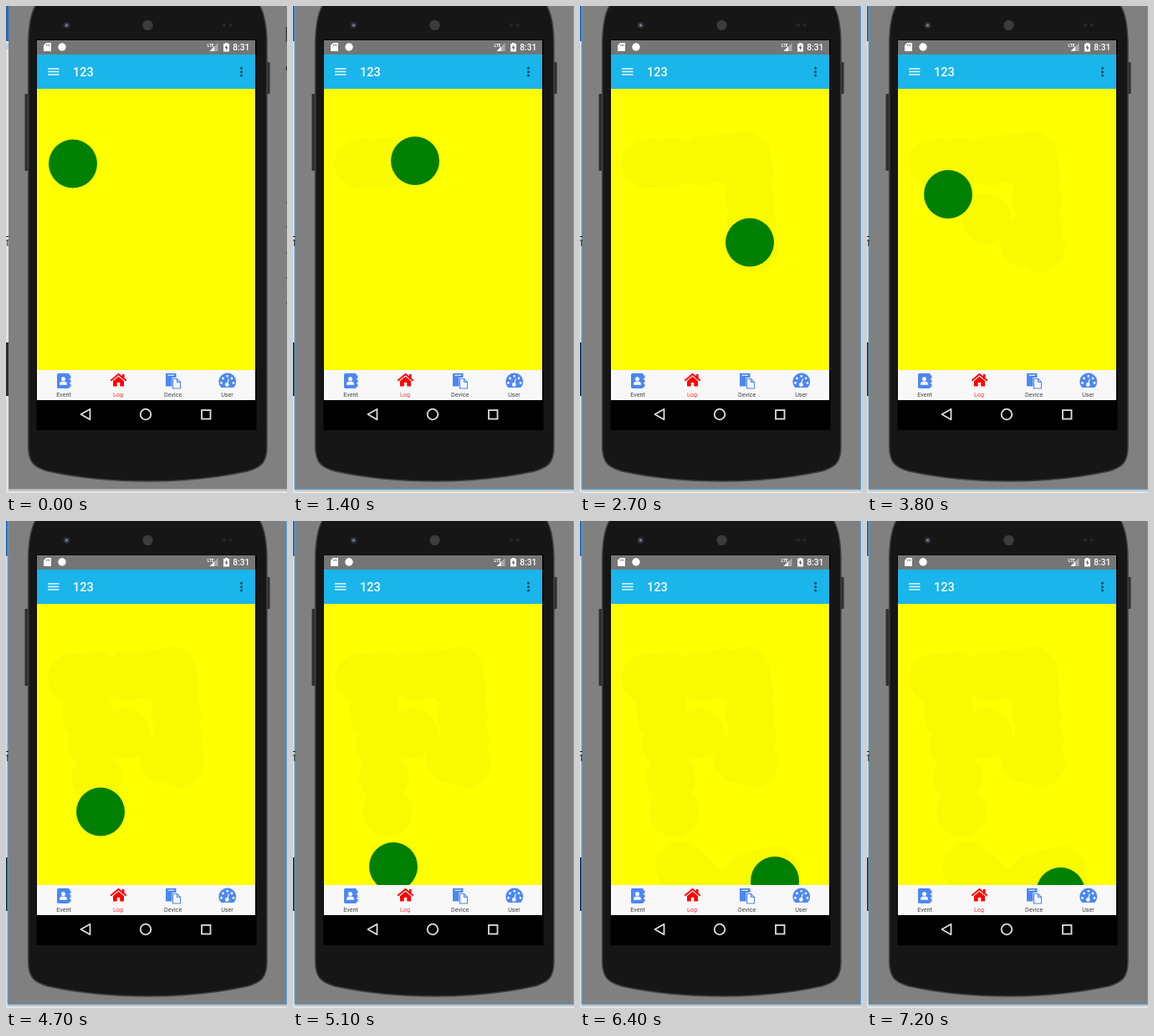
Write an HTML page that moves like this. It is 336 px wide and 582 px high and loops after 8000 ms.

```html
<!DOCTYPE html>
<html lang="en">
<head>
<meta charset="utf-8">
<title>Draggable disc</title>
<style>
  html, body { margin: 0; width: 100%; height: 100%; overflow: hidden; background: #808080; }
  svg { display: block; width: 100vw; height: 100vh; }
  text { font-family: Roboto, sans-serif; }
  .tab { font-size: 7.2px; text-anchor: middle; fill: #444; }
  .line { fill: none; }
</style>
</head>
<body>
<svg viewBox="0 0 336 582" xmlns="http://www.w3.org/2000/svg">
  <defs>
    <clipPath id="page"><rect x="37" y="99" width="261" height="336.5"/></clipPath>
    <linearGradient id="shade" x1="0" y1="0" x2="0" y2="1">
      <stop offset="0" stop-color="#a8a8a8"/><stop offset="1" stop-color="#f2f2f2"/>
    </linearGradient>
    <pattern id="mesh" width="2" height="2" patternUnits="userSpaceOnUse">
      <circle cx="1" cy="1" r=".6" fill="#777"/>
    </pattern>
  </defs>

  <rect width="336" height="582" fill="#808080"/>
  <rect y="577" width="336" height="5" fill="url(#shade)"/>

  <!-- window edges, before and after focus -->
  <g id="idleEdge">
    <path d="M0 0H3V582H0Z" fill="#dfe2e5"/>
    <path d="M0 0H3V42H0Z" fill="#2167bd"/>
    <path d="M0 44H3V52H0Z" fill="#b9cfe8"/>
    <path d="M0 402H3V466H0Z" fill="#2b2b2b"/>
    <path d="M335.5 25V43M335.5 72V77M335 235H336M335 264H336M335 295H336M335 325H336M335 355H336" stroke="#333" stroke-width="1.5"/>
  </g>
  <g id="activeEdge">
    <path d="M0 0H2V582H0Z" fill="#dae5ee"/>
    <path d="M0 0H2V42H0Z" fill="#0f60b5"/>
    <path d="M0 402H2V466H0Z" fill="#0d2a42"/>
    <path class="line" d="M2 0V577.5H335.5V0" stroke="#55a5dc"/>
  </g>
  <path class="line" d="M0 275.5H3M0 280H3M1.8 280V287" stroke="#222"/>

  <!-- phone body -->
  <rect x="22.5" y="105" width="4.5" height="92" rx="1" fill="#303030"/>
  <rect x="311" y="67" width="4.5" height="38" rx="1" fill="#303030"/>
  <path d="M36 -2C31 6 27 18 26.7 45V526C26.7 545 33 551 50 556Q105 568 169.300 568Q234 568 289 556C306 551 312 545 312 526V45C311.700 18 307.500 6 302.500 -2Z" fill="#161616" stroke="#414141" stroke-width="1.500"/>
  <circle cx="72.5" cy="23" r="3.8" fill="#30343a"/>
  <circle cx="72.5" cy="23" r="1.6" fill="#7886a0"/>
  <circle cx="169.5" cy="23" r="6.3" fill="#2a2a2a"/>
  <circle cx="169.5" cy="23" r="6" fill="url(#mesh)"/>
  <circle cx="261" cy="23" r="2" fill="#272727"/>
  <circle cx="268.5" cy="23" r="2" fill="#272727"/>
  <rect x="36.5" y="40.5" width="263" height="466.5" fill="#000"/>

  <!-- status bar -->
  <rect x="37" y="41" width="261" height="17" fill="#757575"/>
  <path d="M48 44H54V54H45V47Z" fill="#fff"/>
  <path d="M48.5 45.5V48M50.3 45.5V48M52.1 45.5V48" stroke="#757575" stroke-width=".8"/>
  <circle cx="67" cy="49" r="4.7" fill="#fff"/>
  <path d="M253.5 44V54H243.5Z" fill="#a9a9a9"/>
  <path d="M249 48.5V54H243.5Z" fill="#fff"/>
  <text x="240.5" y="49" font-size="5" font-weight="700" fill="#fff">LTE</text>
  <path d="M260 45H262V44H265V45H267V54.5H260Z" fill="#fff"/>
  <path d="M264 46.5L261.5 50.3H263.2V53L265.6 49.3H264Z" fill="#666"/>
  <text x="271.3" y="53" font-size="10.2" font-weight="500" fill="#fff">8:31</text>

  <!-- app bar -->
  <rect x="37" y="58" width="261" height="41" fill="#1ab5ea"/>
  <path d="M50 75H63.500M50 78.500H63.500M50 82H63.500" stroke="#e8f7fd" stroke-width="1.400"/>
  <text x="80" y="84" font-size="14.5" font-weight="500" fill="#fff">123</text>
  <path d="M281.500 74.300v0M281.500 78.700v0M281.500 83.100v0" stroke="#0e4a61" stroke-width="3" stroke-linecap="round"/>

  <!-- drag area -->
  <g clip-path="url(#page)">
    <rect x="37" y="99" width="261" height="337" fill="#ff0"/>
    <g id="trail" fill="#f9fa00"></g>
    <circle id="disc" r="29" fill="#008000"/>
  </g>

  <!-- tab bar -->
  <rect x="37" y="435" width="261" height="36" fill="#f8f8f8"/>
  <g fill="#4c87f2">
    <rect x="61" y="439" width="15" height="18" rx="1.8"/>
    <path d="M75.5 441.5H77.5V445H75.5ZM75.5 446.5H77.5V450H75.5ZM75.5 451.5H77.5V455H75.5Z"/>
    <g fill="#fff"><circle cx="68.5" cy="445.7" r="2.5"/><path d="M64 452.8Q64 448.8 67 448.8H70Q73 448.8 73 452.8Z"/></g>
    <path d="M191 439H203.5V444H198.5V454.5H191Z"/>
    <path d="M193.5 441.3H201" stroke="#fff" stroke-width="1"/>
    <path d="M199.5 445.5H204.5L208.5 449.5V457H199.5ZM204.5 445.5V449.5H208.5" fill="#f8f8f8" stroke="#4c87f2" stroke-width="1.1"/>
    <path d="M257.2 456A10.4 10.4 0 1 1 272.3 456Z"/>
    <path d="M257.5 450.5v0M259.5 445v0M264.7 442.300v0M270 445v0M272 450.500v0" stroke="#f8f8f8" stroke-width="2.800" stroke-linecap="round"/>
    <circle cx="264.3" cy="452.5" r="2.4" fill="#f8f8f8"/>
    <path d="M264.5 452L266.3 445.5" stroke="#f8f8f8" stroke-width="1.2"/>
  </g>
  <g fill="#f00">
    <path class="line" d="M125.3 447.8L134.5 440L143.7 447.8" stroke="#f00" stroke-width="2"/>
    <path d="M139 440H141.5V446H139Z"/>
    <path d="M128 448.3L134.5 442.8L141 448.3V454.5H136.3V450H132.7V454.5H128Z"/>
  </g>
  <text class="tab" x="69" y="467">Event</text>
  <text class="tab" x="134" y="467" style="fill:#ff3434">Log</text>
  <text class="tab" x="199.7" y="467">Device</text>
  <text class="tab" x="264.5" y="467">User</text>

  <!-- system keys -->
  <g class="line" stroke="#dedede" stroke-width="1.8">
    <path d="M100.5 481.8V494.2L89.5 488Z" stroke-linejoin="round"/>
    <circle cx="167" cy="488" r="6.3"/>
    <rect x="234" y="483" width="10.5" height="10.5"/>
  </g>
</svg>
<script>
const LOOP = 8000, FOCUS = 900, STEP = 100;

// Drag strokes: when each begins, when it ends and where it leads.
const home = { end: 0, x: 80, y: 188.5 };
const strokes = [
  [1100, 1400, 146, 185],
  [1400, 1600, 198, 180],
  [1600, 2000, 201, 203],
  [2000, 2300, 207, 288.5],
  [2600, 2700, 203, 282.5],
  [3300, 3400, 189, 283],
  [3400, 3600, 97, 225],
  [4300, 4500, 104, 266],
  [4500, 4700, 113, 347.5],
  [4700, 4800, 120, 413],
  [5600, 5900, 155, 442],
  [5900, 6000, 199, 428],
  [6000, 6200, 232, 418],
  [6200, 6400, 233, 430],
  [6700, 6900, 227, 430],
  [7000, 7200, 231.5, 443]
].map(([start, end, x, y]) => ({ start, end, x, y }));

const mix = (a, b, u) => a + (b - a) * u;

// A stroke that begins from rest speeds up; one that carries on is even.
function discAt(t) {
  let from = home;
  for (const to of strokes) {
    if (t <= to.start) break;
    const u = Math.min(1, (t - to.start) / (to.end - to.start));
    const k = to.start > from.end ? u * u : u;
    if (u < 1) return { x: mix(from.x, to.x, k), y: mix(from.y, to.y, k) };
    from = to;
  }
  return from;
}

const el = id => document.getElementById(id);
const show = (node, on) => node.setAttribute("visibility", on ? "visible" : "hidden");
const place = (node, p) => {
  node.setAttribute("cx", p.x);
  node.setAttribute("cy", p.y);
};

// The disc leaves a faint mark at every place it has left.
const disc = el("disc"), marks = [];
for (let t = STEP; t < LOOP; t += STEP) {
  const p = discAt(t - STEP), next = discAt(t);
  if (p.x === next.x && p.y === next.y) continue;
  const node = document.createElementNS("http://www.w3.org/2000/svg", "circle");
  node.setAttribute("r", 30);
  place(node, p);
  marks.push({ node: el("trail").appendChild(node), t });
}

function draw(time) {
  const t = time % LOOP;
  place(disc, discAt(Math.floor(t / STEP) * STEP));
  marks.forEach(m => show(m.node, t >= m.t));
  show(el("idleEdge"), t < FOCUS);
  show(el("activeEdge"), t >= FOCUS);
}

const origin = performance.now();
function tick() {
  draw(performance.now() - origin);
  requestAnimationFrame(tick);
}
tick();
</script>
</body>
</html>
```
